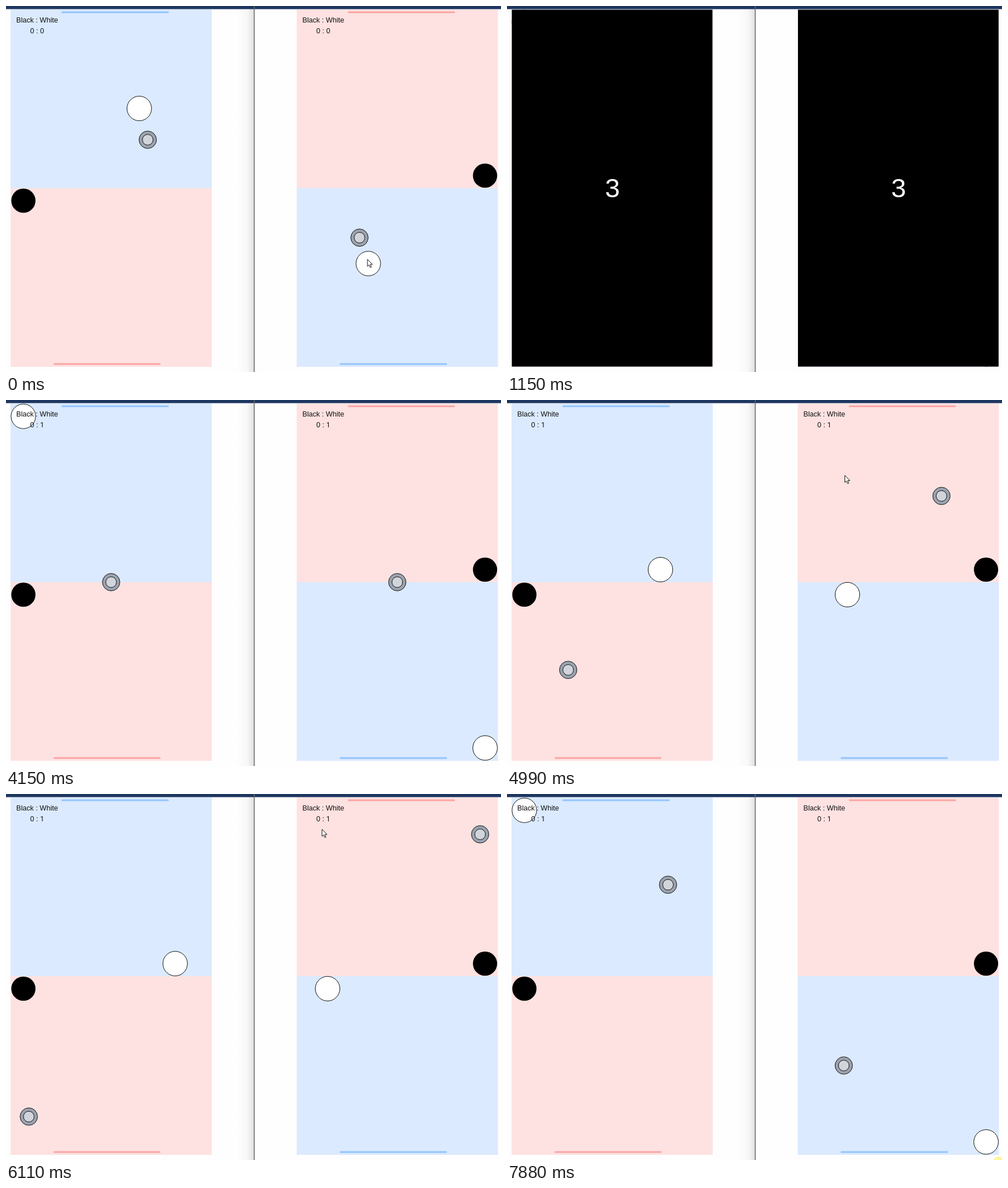
Write an HTML page that moves like this. It is 871x643 px and loops after 7.94 s.

```html
<!DOCTYPE html>
<html lang="en">
<head>
<meta charset="utf-8">
<title>Air hockey</title>
<style>
html, body { margin: 0; width: 100%; height: 100%; overflow: hidden; background: #fefefe; }
svg { display: block; width: 871px; height: 643px; }
text { font-family: "Liberation Sans", Arial, sans-serif; font-size: 12.6px; fill: #111; white-space: pre; }
.one { font-family: Roboto, sans-serif; }
.count { font-size: 47px; fill: #fff; text-anchor: middle; }
</style>
</head>
<body>
<svg viewBox="0 0 871 643">
  <defs>
    <linearGradient id="shade">
      <stop offset="0" stop-opacity="0"/>
      <stop offset=".6" stop-opacity=".025"/>
      <stop offset="1" stop-opacity=".12"/>
    </linearGradient>
  </defs>
  <rect x="406" y="5" width="30" height="638" fill="url(#shade)"/>
  <g id="boards"></g>
  <rect width="871" height="5.5" fill="#1d3660"/>
  <rect x="436" width="1.5" height="643" fill="#666"/>
  <circle id="glow" cx="866" cy="649" r="12" fill="#fff59a"/>
  <path id="cursor" d="M0 0V12.4L2.9 9.8 4.9 14.4 6.9 13.5 5 9H8.8Z" fill="#fff" stroke="#111" stroke-linejoin="round"/>
</svg>
<script>
const LOOP = 7940, GOAL = 1000, COUNT_START = 1150, COUNT_END = 4150;
const STEP = 68.5, PUCK_LAG = 15, MALLET_LAG = 60;
const $ = id => document.getElementById(id);
const clamp = (v, lo, hi) => Math.min(hi, Math.max(lo, v));

// The screen refreshes in bursts of even steps
const BURSTS = [0, 70, 880, 1680, 4150, 4990, 5840, 6650, 7460];

// [time, x, y] where the puck turns, in left-board space
const PUCK = [
  [-15, 251.5, 233], [0, 249.4, 235], [300, 207, 280], [960, 184, 617],
  [GOAL, 185, 320], [COUNT_END, 185, 320], [5768, 36, 617],
  [5890, 28, 601], [6113, 40, 567], [6990, 140, 367], [7875, 284, 158.5]
];
// [time, x, y] where the hand turns, in right-board space
const HAND = [
  [-120, 639, 460], [0, 636, 445], [250, 650, 395], [690, 712, 538],
  [750, 789, 544], [900, 880, 660], [1610, 880, 660], [1680, 865, 616],
  [1740, 880, 660], [4330, 880, 660], [4480, 720, 400], [4870, 603.5, 200],
  [4990, 594.5, 132.5], [5993, 576, 70], [6113, 556, 62], [6930, 576, 64],
  [6990, 605.5, 67], [7070, 690, 350], [7330, 880, 660]
];

function snap(t) {
  const first = BURSTS.filter(b => b <= t).pop();
  return first + Math.floor((t - first) / STEP + 0.35) * STEP;
}

function at(path, t) {
  const i = path.findIndex(p => p[0] > t);
  if (i < 0) return path[path.length - 1].slice(1);
  const [t0, x0, y0] = path[Math.max(0, i - 1)], [t1, x1, y1] = path[i];
  const k = t1 > t0 ? (t - t0) / (t1 - t0) : 0;
  return [x0 + (x1 - x0) * k, y0 + (y1 - y0) * k];
}

// The white mallet trails the hand inside its own half; result in left-board space
function mallet(t) {
  const [x, y] = at(HAND, t);
  return [873.5 - clamp(x, 533.5, 843), 640 - clamp(y, 342, 611.3)];
}

const move = (el, [x, y]) => el.setAttribute("transform", `translate(${x} ${y})`);

function board(dx, turn) {
  return `<g transform="rotate(${turn} 436.75 320)">
    <rect x="8" y="6" width="354" height="314" fill="#dbeafe"/>
    <rect x="8" y="320" width="354" height="314" fill="#fde2e1"/>
    <path d="M99 11H285" stroke="#93c5fd" stroke-width="3" stroke-linecap="round"/>
    <path d="M85 629H270.5" stroke="#fca5a5" stroke-width="3" stroke-linecap="round"/>
    <circle cx="30.6" cy="342" r="21.3"/>
    <g class="puck" stroke="#111">
      <circle r="15.3" fill="#9ca3af"/><circle r="9.4" fill="#d1d5db"/>
    </g>
    <circle class="mallet" r="21.6" fill="#fff" stroke="#111"/>
  </g>
  <g transform="translate(${dx} 0)">
    <text x="18" y="29">Black : White</text>
    <text x="42.5" y="48">0 : <tspan class="score">0</tspan></text>
    <g class="cover">
      <rect x="8.5" y="6.5" width="353" height="627"/>
      <text class="count" x="185.5" y="336"></text>
    </g>
  </g>`;
}

$("boards").innerHTML = board(0, 0) + board(503.5, 180);
const all = name => [...document.querySelectorAll("." + name)];
const pucks = all("puck"), mallets = all("mallet"), scores = all("score");
const covers = all("cover"), counts = all("count");

function digit(el, n) {
  el.textContent = n;
  el.classList.toggle("one", n === 1);
}

function draw(t) {
  const s = snap(t);
  pucks.forEach((el, i) => move(el, at(PUCK, s - PUCK_LAG * i)));
  mallets.forEach((el, i) => move(el, mallet(s - MALLET_LAG * (2 - i))));
  move($("cursor"), at(HAND, s));

  const counting = t >= COUNT_START && t < COUNT_END;
  scores.forEach(el => digit(el, s >= GOAL ? 1 : 0));
  counts.forEach(el => digit(el, 3 - Math.floor((t - COUNT_START) / 1000)));
  covers.forEach(el => el.style.display = counting ? "" : "none");
  $("glow").style.display = t >= 7800 ? "" : "none";
}

const start = performance.now();
function frame() {
  draw((performance.now() - start) % LOOP);
  requestAnimationFrame(frame);
}
frame();
</script>
</body>
</html>
```
